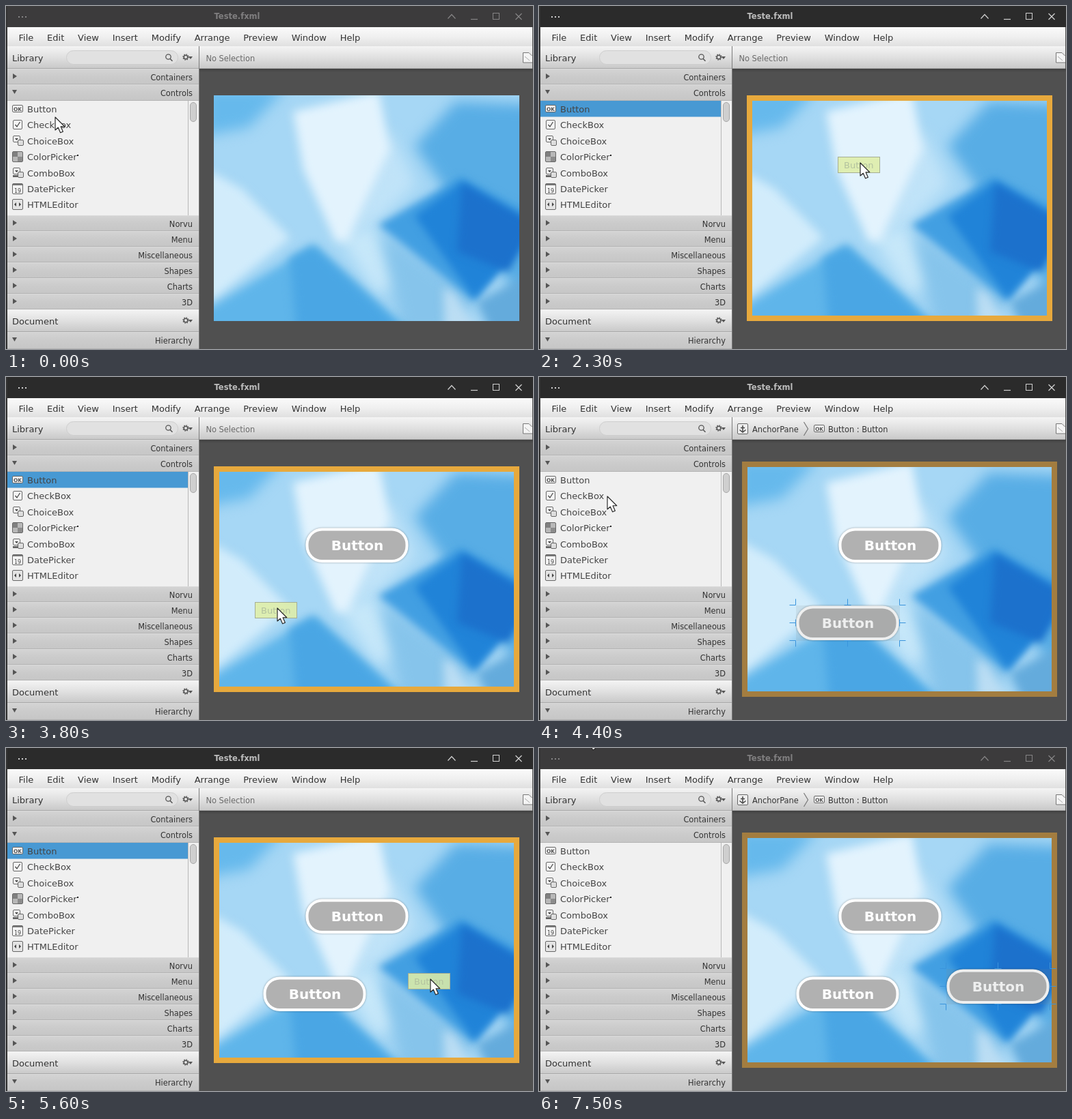
These frames come from a looping animation (771 px wide and 503 px high, 7600 ms). An HTML page with a canvas:

```html
<!DOCTYPE html>
<html lang="en">
<head>
<meta charset="utf-8">
<title>Teste.fxml</title>
<style>
html, body { margin: 0; width: 100%; height: 100%; overflow: hidden; background: #505050; }
canvas { display: block; width: 771px; height: 503px; }
</style>
</head>
<body>
<canvas id="stage" width="771" height="503"></canvas>
<script>
const W = 771, H = 503, LOOP = 7600, STEP = 100;
const FONT = '"DejaVu Sans", sans-serif';
const INK = '#444';
const stage = document.getElementById('stage').getContext('2d');
let c = stage;

// Pointer stops and the three drags; dx, dy place each button relative to the first.
const START = [72, 163], ROW = [56, 151], EXIT = [71, -20];
const DRAGS = [
  { start: 1900, drop: 2400, tip: [470, 230], dx: 0, dy: 0 },
  { start: 3400, drop: 4000, tip: [408, 345], dx: -62, dy: 114 },
  { start: 5000, drop: 5800, tip: [628, 341], dx: 158, dy: 103 }
];

const unit = v => Math.min(1, Math.max(0, v));
const easeOut = p => 1 - (1 - p) ** 3;
const easeInOut = p => p < .5 ? 4 * p ** 3 : 1 - 4 * (1 - p) ** 3;
const mix = (a, b, k) => a.map((v, i) => Math.round(v + (b[i] - v) * k));

function pointer(t) {
  const next = DRAGS.find(d => t < d.drop);
  if (!next) return mix(DRAGS[2].tip, EXIT, easeOut(unit((t - 6000) / 1000)));
  if (t >= next.start) {
    const length = next.drop - STEP - next.start;
    return mix(ROW, next.tip, easeInOut(unit((t - next.start) / length)));
  }
  const last = DRAGS[DRAGS.indexOf(next) - 1];
  if (last) return mix(last.tip, ROW, easeOut(unit((t - last.drop) / 800)));
  const p = unit((t - 900) / 800);
  const [x, y] = mix(START, ROW, p);
  return [x + 26 * Math.sin(Math.PI * p), y + 6 * Math.sin(Math.PI * p)];
}

function box(x, y, w, h, fill) {
  c.fillStyle = fill;
  c.fillRect(x, y, w, h);
}

function frame(x, y, w, h, color, width = 1) {
  c.strokeStyle = color;
  c.lineWidth = width;
  c.strokeRect(x, y, w, h);
}

function fade(x, y, w, h, ...colors) {
  const g = c.createLinearGradient(0, y, 0, y + h);
  colors.forEach((col, i) => g.addColorStop(i / (colors.length - 1), col));
  box(x, y, w, h, g);
}

function text(s, x, y, size, color = '#333', align = 'left', weight = '') {
  c.font = `${weight} ${size}px ${FONT}`;
  c.textAlign = align;
  c.fillStyle = color;
  c.fillText(s, x, y);
}

function trace(p) {
  c.beginPath();
  for (let i = 0; i < p.length; i += 2) c.lineTo(p[i], p[i + 1]);
}

function line(color, width, ...p) {
  c.strokeStyle = color;
  c.lineWidth = width;
  trace(p);
  c.stroke();
}

function poly(fill, ...p) {
  c.fillStyle = fill;
  trace(p);
  c.closePath();
  c.fill();
}

function ring(x, y, r, width) {
  c.strokeStyle = '#555';
  c.lineWidth = width;
  c.beginPath();
  c.arc(x, y, r, 0, 7);
  c.stroke();
}

function pill(x, y, w, h, r, fill, stroke, width = 1) {
  c.beginPath();
  c.roundRect(x, y, w, h, r);
  c.fillStyle = fill;
  c.fill();
  if (stroke) {
    c.strokeStyle = stroke;
    c.lineWidth = width;
    c.stroke();
  }
}

function tile(x, y, w, h, fill = '#f4f4f4') {
  pill(x + .5, y + .5, w - 1, h - 1, 1.5, fill, '#666');
}

function layer(paint) {
  const cv = document.createElement('canvas');
  cv.width = W;
  cv.height = H;
  c = cv.getContext('2d');
  paint();
  c = stage;
  return cv;
}

// Soft facets, broad ones first.
function paintBackdrop() {
  c.beginPath();
  c.rect(304, 131, 447, 331);
  c.clip();
  box(304, 131, 447, 331, '#a6d7f5');
  c.filter = 'blur(10px)';
  poly('#66b9ec', 290, 120, 410, 120, 355, 178, 290, 190);
  poly('#58ade5', 598, 205, 658, 140, 780, 145, 780, 470);
  poly('#c0e3f8', 560, 180, 600, 262, 540, 318, 500, 345);
  poly('#c6e7f9', 485, 335, 540, 325, 575, 410, 540, 420);
  poly('#86c4eb', 548, 330, 690, 430, 640, 480, 580, 480);
  c.filter = 'blur(7px)';
  poly('#e3f3fd', 420, 155, 545, 125, 562, 210, 500, 345, 482, 345, 435, 240);
  poly('#d2ecfb', 285, 235, 345, 268, 416, 340, 285, 445);
  poly('#5fb5ea', 285, 450, 450, 350, 590, 475, 285, 480);
  poly('#4aa6e4', 415, 370, 450, 352, 580, 475, 425, 475);
  poly('#64abdc', 688, 434, 780, 385, 780, 480, 710, 480);
  poly('#bbddf3', 640, 413, 656, 420, 692, 480, 642, 480);
  c.filter = 'blur(6px)';
  poly('#429fe2', 545, 321, 665, 250, 780, 310, 685, 434);
  poly('#2083d8', 598, 308, 668, 257, 780, 325, 685, 429);
  poly('#1c71cc', 667, 260, 770, 318, 735, 390, 660, 360);
  c.filter = 'none';
}

function header(name, y, h, open) {
  fade(2, y, 280, h, '#d4d4d4', '#cbcbcb', '#c6c6c6');
  box(2, y, 280, 1, '#dadada');
  box(2, y + h - 1, 280, 1, '#b4b4b4');
  const m = y + 11;
  if (open) poly('#555', 9, m - 3, 16, m - 3, 12.5, m + 3);
  else poly('#555', 10, m - 4, 16, m, 10, m + 4);
  text(name, 273, y + 17, 11.4, '#333', 'right');
}

function toolbar(name, y, w) {
  fade(2, y, w, 33, '#f4f4f4', '#e0e0e0', '#c8c8c8');
  box(2, y + 32, w, 1, '#a8a8a8');
  text(name, 9, y + 22, 13);
  ring(263, y + 16, 2.8, 1.5);
  c.setLineDash([1.4, 1.75]);
  ring(263, y + 16, 4, 1.5);
  c.setLineDash([]);
  poly('#555', 267, y + 15, 273, y + 15, 270, y + 19);
}

function okIcon(x, y) {
  tile(x, y, 16, 11);
  text('OK', x + 8, y + 8.5, 7.5, '#555', 'center', 'bold');
}

function pair(y, w) {
  tile(10, y - 8, 11, 10);
  poly(INK, 13, y - 4, 18, y - 4, 15.5, y - 1);
  tile(w, y - 2, 9, 9, '#ddd');
}

const ROWS = {
  Button: y => okIcon(9, y - 6),
  CheckBox: y => {
    tile(10, y - 7, 14, 14);
    line(INK, 1.2, 13.5, y, 16, y + 3, 20.5, y - 4);
  },
  ChoiceBox: y => pair(y, 17),
  ColorPicker: y => {
    tile(9, y - 8, 16, 16, '#b8b8b8');
    box(10, y - 7, 7, 7, '#808080');
    box(17, y, 7, 7, '#8c8c8c');
  },
  ComboBox: y => {
    pair(y, 17);
    box(10, y + 3, 8, 3, '#666');
  },
  DatePicker: y => {
    tile(9, y - 8, 16, 16);
    box(10, y - 7, 14, 2, '#777');
    text('19', 17, y + 5.5, 8, INK, 'center');
  },
  HTMLEditor: y => {
    tile(9, y - 8, 16, 16, '#e4e4e4');
    for (const s of [-1, 1]) poly(INK, 17 + s * 2, y - 3, 17 + s * 2, y + 3, 17 + s * 5, y);
  }
};

function paintChrome() {
  box(0, 0, W, H, '#505050');
  fade(283, 92, 488, 5, '#404040', '#505050');
  fade(2, 31, 768, 28, '#fafafa', '#f0f0f0', '#e0e0e0');
  let x = 18.5;
  for (const name of ['File', 'Edit', 'View', 'Insert', 'Modify', 'Arrange', 'Preview', 'Window', 'Help']) {
    text(name, x, 51, 13);
    x += c.measureText(name).width + 19.8;
  }

  toolbar('Library', 59, 768);
  pill(88.5, 65.5, 163, 20, 10, '#e1e1e1', '#cecece');
  ring(237.5, 74.5, 3.7, 1.3);
  line('#555', 1.6, 240, 77.2, 243.5, 80.7);
  poly('#f4f4f4', 757, 68, 765, 68, 770, 73, 770, 83, 757, 83);
  line('#777', 1, 770, 83, 756.5, 83, 756.5, 68.5, 765, 68.5, 769.5, 73);
  line('#aaa', 1, 759, 74, 766, 80);

  header('Containers', 92, 23);
  header('Controls', 115, 24, true);
  box(2, 139, 280, 168, '#f0f0f0');
  box(266, 139, 1, 168, '#b8b8b8');
  pill(269.5, 141.5, 9, 28, 4.5, '#cfcfcf', '#a8a8a8');
  ['Norvu', 'Menu', 'Miscellaneous', 'Shapes', 'Charts', '3D']
    .forEach((name, i) => header(name, 307 + i * 23, 23));
  toolbar('Document', 445, 280);
  header('Hierarchy', 478, 25, true);
  box(282, 59, 1, 444, '#7c7c7c');
  c.drawImage(backdrop, 0, 0);
}

function titleBar(active) {
  const ink = active ? '#d0d0d0' : '#858485';
  box(0, 0, W, 31, active ? '#2b2b2b' : '#3c3b3c');
  box(0, 0, 2, H, '#333');
  text('Teste.fxml', 338, 19, 11.5, active ? '#bdbdbd' : '#807f80', 'center', 'bold');
  for (let i = 0; i < 3; i++) box(18 + i * 5, 15, 2, 2, ink);
  line(ink, 1.2, 646.5, 18.5, 652, 12.5, 657.5, 18.5);
  line(ink, 1.2, 680, 19.5, 690, 19.5);
  frame(712.5, 10.5, 9, 9, ink);
  for (const s of [-4.5, 4.5]) line(ink, 1.2, 750 - s, 11, 750 + s, 20);
}

function list(selected) {
  if (selected) box(2, 139, 264, 23.5, '#4899d3');
  Object.entries(ROWS).forEach(([name, icon], i) => {
    const y = Math.round(151 + i * 23.4);
    icon(y);
    text(name, 31, y + 5, 13, INK);
  });
  box(104, 218, 2, 2, '#222');
}

function crumbs(selected) {
  if (!selected) return text('No Selection', 292.5, 81, 11.4, '#6a6a6a');
  tile(290, 68, 16, 16, '#eee');
  line(INK, 1.5, 298, 71, 298, 81);
  line(INK, 1.5, 295, 74.5, 301, 74.5);
  line(INK, 1.5, 293.5, 77.5, 298, 81, 302.5, 77.5);
  text('AnchorPane', 312, 81, 11.4);
  line('#777', 1.2, 387.5, 66, 393.5, 76, 387.5, 86);
  okIcon(402, 70);
  text('Button : Button', 423, 81, 11.4);
}

function button({ dx, dy }, selected) {
  c.save();
  c.translate(dx, dy);
  c.shadowColor = 'rgba(0,0,0,.35)';
  c.shadowBlur = 3;
  pill(438.5, 221.5, 150, 50.5, 24, '#fff');
  c.shadowColor = 'transparent';
  pill(442.5, 225.5, 142, 42.5, 20, '#b1b1b1');
  text('Button', 514, 254, 20, '#fff', 'center', 'bold');
  if (selected) {
    box(438, 221, 152, 52, 'rgba(125,135,135,.13)');
    brackets(513.5, 246.5, 76, 26);
  }
  c.restore();
}

// Corner marks and edge ticks around a centre, with half sizes.
function brackets(x, y, w, h) {
  const blue = '#3a94dc', arm = 9, tick = 5;
  for (const s of [-1, 1]) {
    const ex = x + s * w, ey = y + s * h;
    for (const v of [-1, 1])
      line(blue, 1, ex, y + v * (h + arm), ex, y + v * h, ex + s * arm, y + v * h);
    line(blue, 1, ex, y - tick, ex, y + tick);
    line(blue, 1, ex, y, ex + s * arm, y);
    line(blue, 1, x - tick, ey, x + tick, ey);
    line(blue, 1, x, ey, x, ey + s * arm);
  }
}

function ghost(x, y, overCanvas) {
  if (overCanvas) {
    box(x - 32, y - 9, 61, 24, 'rgba(224,238,168,.88)');
    frame(x - 32.5, y - 8.5, 61, 23, '#a5ae94');
    text('Button', x - 24, y + 8, 13, '#b3c29f');
  } else {
    pill(x - 38.5, y - 7.5, 19, 19, 2, 'rgba(246,246,246,.92)', '#d0d0d0');
    okIcon(x - 37, y - 3);
  }
}

function cursor(x, y) {
  c.save();
  c.translate(x, y);
  c.scale(.95, .95);
  c.lineJoin = 'round';
  poly('#fff', 0, 0, 0, 20, 4.5, 16, 8, 24, 12, 22.3, 8.5, 14.5, 14.5, 14.5);
  c.strokeStyle = '#222';
  c.lineWidth = 1.2;
  c.stroke();
  c.restore();
}

const backdrop = layer(paintBackdrop);
const chrome = layer(paintChrome);

function draw(t) {
  const [x, y] = pointer(t);
  const drag = DRAGS.find(d => t >= d.start && t < d.drop);
  const placed = DRAGS.filter(d => t >= d.drop);
  const selected = drag ? null : placed[placed.length - 1];
  const overCanvas = x >= 304 && x < 751 && y >= 131 && y < 462;

  c.drawImage(chrome, 0, 0);
  titleBar(t >= 100 && t < 7300);
  list(DRAGS.some(d => t >= d.start - STEP && t < d.drop));
  crumbs(selected);
  if (selected) frame(301, 128, 453, 337, '#a37d40', 8);
  for (const d of placed) button(d, d === selected);
  if (drag) {
    if (overCanvas) frame(308, 135, 439, 323, '#e7a93d', 8);
    ghost(x, y, overCanvas);
  }
  cursor(x, y);
}

function tick() {
  const t = performance.now() % LOOP;
  draw(Math.floor(t / STEP) * STEP);
  requestAnimationFrame(tick);
}
tick();
</script>
</body>
</html>
```
